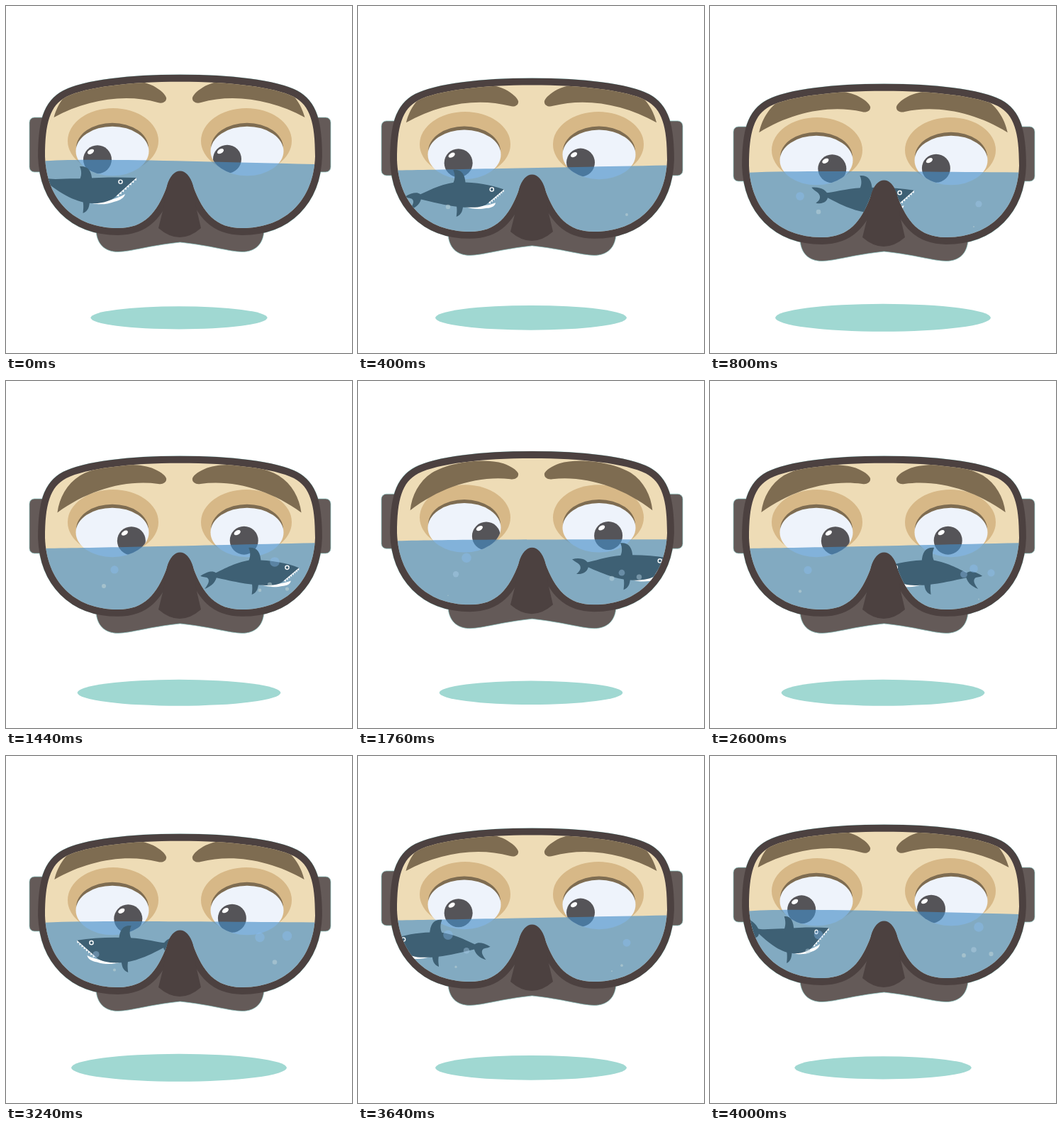
An HTML page that plays this animation: 488x489 px, repeating every 4.04 s.

```html
<!DOCTYPE html>
<html lang="en">
<head>
<meta charset="utf-8">
<title>Diving mask</title>
<style>
  html, body { margin: 0; width: 100%; height: 100%; overflow: hidden; background: #fff; }
  svg { display: block; width: 488px; height: 489px; }
  .dark { fill: #4c4140; }
  .rubber { fill: #645a58; stroke: #93cfca; stroke-width: .7; }
  .brow { fill: #7e6c51; }
  .flesh { fill: #3e6074; }
</style>
</head>
<body>
<svg viewBox="0 0 488 489">
  <defs>
    <path id="lens" d="M245.5 106.7 C175 106.7 113 114 85 128 C62 140 55 165 55 212 C57 272 95 313 158 313
      C195 313 213 292 227 254 C231 240 238 233 245.5 233 C253 233 260 240 264 254
      C278 292 296 313 333 313 C396 313 434 272 436 212 C436 165 429 140 406 128 C378 114 316 106.7 245.5 106.7Z"/>
    <path id="brow" d="M74 181 C76 160 86 140 104 128 C130 112 178 106 205 114 C216 118 224 123 226 128
      C227 134 221 137 215 136 C168 131 116 148 74 181Z"/>
    <clipPath id="lensClip"><use href="#lens"/></clipPath>
    <clipPath id="eyeL"><ellipse cx="150" cy="204.5" rx="51.5" ry="34.8"/></clipPath>
    <clipPath id="eyeR"><ellipse cx="340" cy="204.5" rx="51.5" ry="34.8"/></clipPath>
    <g id="pupil">
      <circle r="20" fill="#555458"/>
      <ellipse cx="-9.5" cy="-11" rx="5" ry="3" fill="#fff" transform="rotate(-30 -9.5 -11)"/>
    </g>
  </defs>

  <ellipse id="shadow" cx="244" cy="439.3" fill="#a0d8d2"/>

  <g id="mask">
    <use href="#lens" fill="none" stroke="#93cfca" stroke-width="20.4"/>
    <rect class="rubber" x="33" y="157" width="30" height="77" rx="7"/>
    <rect class="rubber" x="428" y="157" width="30" height="77" rx="7"/>
    <path class="rubber" d="M127 314 C127 336 140 346.5 158 346.5 C177 346 200 338 245.5 333
      C291 338 314 346 333 346.5 C351 346.5 364 336 364 314 L350 300 L290 268 H201 L141 300Z"/>
    <use href="#lens" fill="none" stroke="#4c4140" stroke-width="19.8"/>

    <g clip-path="url(#lensClip)">
      <rect x="40" y="90" width="410" height="240" fill="#eedcb6"/>
      <g fill="#d7b887">
        <ellipse cx="151" cy="190" rx="64" ry="46"/>
        <ellipse cx="339" cy="190" rx="64" ry="46"/>
      </g>
      <g class="brow">
        <ellipse cx="150" cy="200" rx="51" ry="35.3"/>
        <ellipse cx="340" cy="200" rx="51" ry="35.3"/>
      </g>
      <g clip-path="url(#eyeL)">
        <rect x="90" y="160" width="120" height="90" fill="#eef3fb"/>
        <use id="pupilL" href="#pupil"/>
      </g>
      <g clip-path="url(#eyeR)">
        <rect x="280" y="160" width="120" height="90" fill="#eef3fb"/>
        <use id="pupilR" href="#pupil"/>
      </g>
      <use id="browL" class="brow" href="#brow"/>
      <g transform="translate(489 0) scale(-1 1)"><use id="browR" class="brow" href="#brow"/></g>

      <path id="water" fill="rgb(68,141,200)" fill-opacity=".63"/>

      <g id="shark">
        <path id="jaw" fill="#fff"/>
        <path id="teeth" fill="#fff"/>
        <path id="body" class="flesh"/>
        <path id="tail" class="flesh"/>
        <path class="flesh" d="M-3 -1 C8 -2 14 4 14.5 20 L-4 20 C0 12 0 6 -3 -1Z"/>
        <path class="flesh" d="M1 46 C3 54 2 60 1.5 65 C9 62 11 56 11 46Z"/>
        <circle id="eye" r="2.6" fill="#3e6074" stroke="#fff" stroke-width="1.4"/>
      </g>
      <g id="bubbles"></g>
    </g>

    <path class="dark" d="M245.5 232.5 C238 232.5 231 239.5 227 253.5 L222.5 283 L215 313 Q245 339 275 313
      L268 283 L264 253.5 C260 239.5 253 232.5 245.5 232.5Z"/>
  </g>
</svg>

<script>
  const LOOP = 4040, HALF = LOOP / 2, STEP = 40, SWIM = 1830;
  const $ = id => document.getElementById(id);
  const set = (id, attrs) => {
    for (const k in attrs) $(id).setAttribute(k, attrs[k]);
  };
  const clamp = v => Math.min(1, Math.max(0, v));
  const mix = (a, b, f) => a + (b - a) * f;
  const ease = v => (1 - Math.cos(Math.PI * clamp(v))) / 2;

  // Distance risen by the bubbles: [ms, px]
  const RISE = [[0, -46], [800, 0], [1440, 20], [2080, 40], [2600, 42.5], [3240, 63.5], [4040, 102]];
  const riseAt = t => {
    const i = RISE.findIndex(p => p[0] > t);
    const [a, b] = [RISE[i - 1], RISE[i]];
    return mix(a[1], b[1], (t - a[0]) / (b[0] - a[0]));
  };

  // Bubble columns: [x, rise at first birth]
  const COLUMNS = [[127, -45], [138, 0], [153, -23], [358, 6], [372, -2], [379, -34], [396.5, 4]];
  const PERIOD = 75, LIFE = 60;
  const dots = COLUMNS.map(() => {
    const dot = document.createElementNS('http://www.w3.org/2000/svg', 'circle');
    return $('bubbles').appendChild(dot);
  });

  function drawBubbles(t) {
    const rise = riseAt(t);
    COLUMNS.forEach(([x, birth], i) => {
      const age = (rise - birth) % PERIOD;
      const f = clamp((age - 20) / 20);
      const dot = dots[i];
      dot.setAttribute('visibility', rise > birth && age < LIFE ? 'visible' : 'hidden');
      dot.setAttribute('cx', x);
      dot.setAttribute('cy', 300 - age);
      dot.setAttribute('r', Math.max(.5, Math.min(6.8, .7 + age * .115)));
      dot.setAttribute('fill',
        `rgba(${mix(200, 140, f)},${mix(217, 190, f)},${mix(216, 245, f)},${mix(.5, .36, f)})`);
    });
  }

  // Head and tail lift with the swell; the snout draws in as they sink
  const bend = (x, swell) => -swell * (x > 0 ? 6.5 * (x / 77) ** 2 : 12 * (x / 55) ** 2);
  const squeeze = (x, swell) => x > 0 ? x - 4.7 * (1 - swell) * (x / 77) ** 3 : x;
  const bent = (d, swell) => d.replace(/(-?[\d.]+),(-?[\d.]+)/g,
    (_, x, y) => `${squeeze(+x, swell).toFixed(2)},${(+y + bend(+x, swell)).toFixed(2)}`);

  const BODY = 'M-52,26 C-40,25 -25,18 0,16.3 C25,15 52,17 77,21.5 L49,43 C44,48 36,51 22,51.5 ' +
    'C-2,52 -20,46 -52,31Z';
  const TAIL = 'M-71,21 C-58,18 -48,23 -48,30 C-48,38 -55,43 -65,42 ' +
    'C-60,38 -58,34 -60,30 C-62,26 -66,26 -71,21Z';
  const JAW = 'M14,51 C30,50 48,48 61,42 C60,47 54,50 46,51 C36,54 24,54 14,51Z';
  const TEETH = (() => {
    let d = 'M77,21.5';
    for (let i = 0; i < 8; i++) {
      const x = 77 - i * 3.5, y = 21.5 + i * 2.7;
      d += ` L${x - .3},${y + 4} L${x - 3.5},${y + 2.7}`;
    }
    return d + ' L45,42 L70,22Z';
  })();

  function drawShark(t, swell) {
    const back = t >= HALF, u = t % HALF;
    const way = ease(u / SWIM);
    const x = mix(107, 374, back ? 1 - way : way);
    const turn = 1 - 2 * ease((u - SWIM) / (HALF - SWIM));
    const flip = (back ? -turn : turn) || .001;
    set('shark', { transform: `translate(${x} 227) scale(${flip} 1)` });
    set('body', { d: bent(BODY, swell) });
    set('tail', { d: bent(TAIL, swell) });
    set('jaw', { d: bent(JAW, swell) });
    set('teeth', { d: bent(TEETH, swell) });
    set('eye', { cx: squeeze(54.5, swell), cy: 24 + bend(54.5, swell) });
  }

  // Pupils go from one side to a crossed pose, rest, then to the other side
  function drawEyes(t) {
    const s = 1 - Math.abs(t - HALF) / HALF;
    const a = 1 - Math.cos(clamp(s / .4) * Math.PI / 2);
    const b = Math.sin(clamp((s - .6) / .4) * Math.PI / 2);
    const look = (from, mid, to) => from + (mid - from) * a + (to - mid) * b;
    set('pupilL', { transform: `translate(${look(129, 173, 182)} 216.3)` });
    set('pupilR', { transform: `translate(${look(312, 319, 358)} 215.7)` });
    const lift = t < HALF ? ease(t / HALF) : 1 - ease((t - 2150) / 1490);
    const tilt = { transform: `rotate(${9.5 * (1 - lift)} 215 130)` };
    set('browL', tilt);
    set('browR', tilt);
  }

  function draw(t) {
    const angle = 2 * Math.PI * t / HALF;
    const drop = (1 - Math.cos(angle)) / 2;
    const swell = Math.cos(2 * angle);
    set('mask', { transform: `translate(0 ${14.5 * drop})` });
    set('shadow', { rx: 124.5 + 30.5 * drop, ry: 16.1 + 3.8 * drop });
    set('water', {
      d: `M50 ${223 - 4.5 * swell} C120 ${220.5 - 6.5 * swell} 250 ${221 - 2.5 * swell} ` +
        `441 ${221 + 2 * swell} V330 H50Z`
    });
    drawEyes(t);
    drawShark(t, swell);
    drawBubbles(t);
  }

  const start = performance.now();
  function tick() {
    const t = Math.max(0, performance.now() - start) % LOOP;
    draw(Math.floor(t / STEP) * STEP);
    requestAnimationFrame(tick);
  }
  tick();
</script>
</body>
</html>
```
